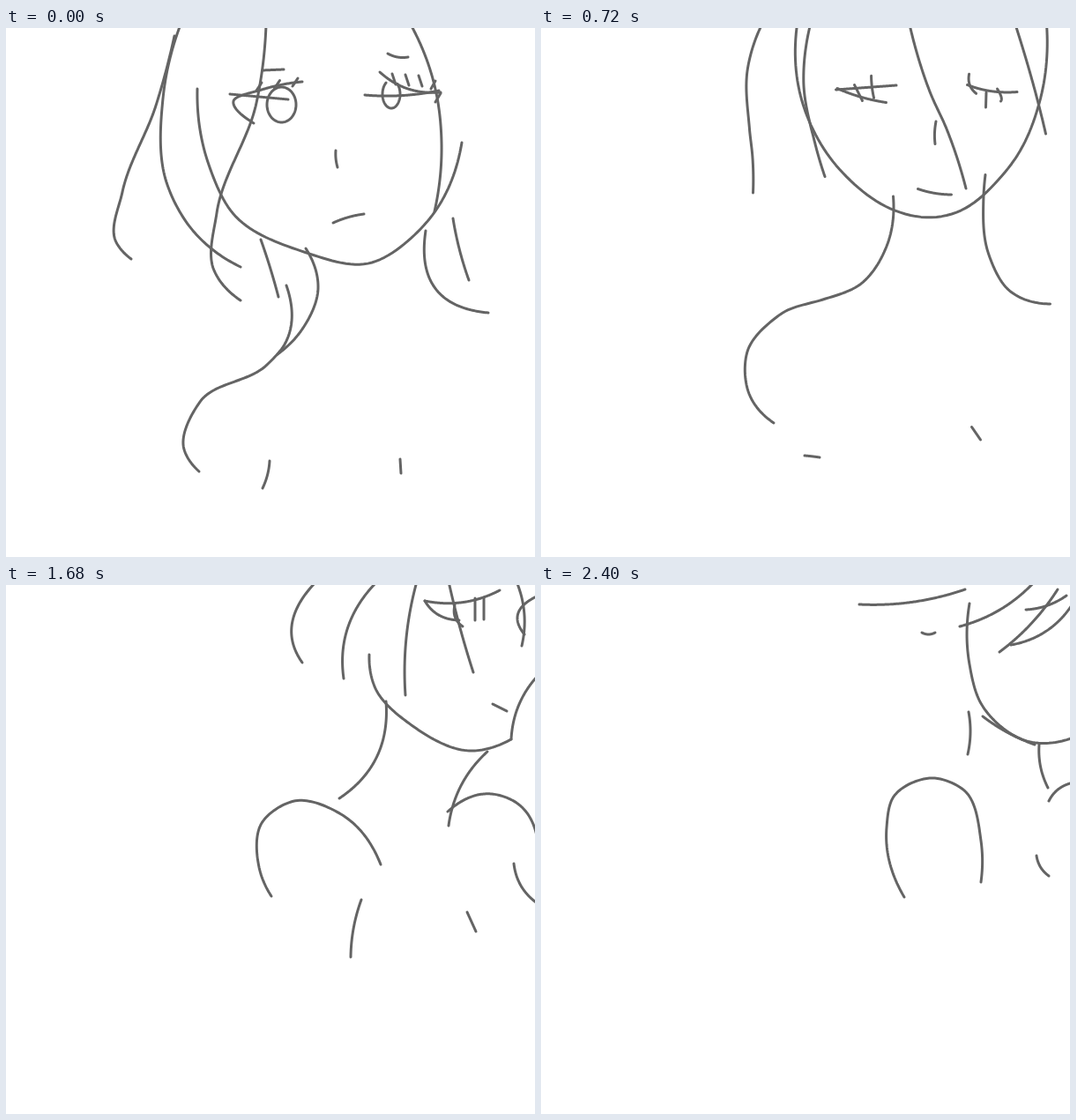
Animation, 600 px wide and 600 px high, one loop 2480 ms. Source, as an HTML page with a canvas:

```html
<!DOCTYPE html>
<html lang="en">
<head>
<meta charset="utf-8">
<title>Line sketch</title>
<style>
html, body { margin: 0; width: 100%; height: 100%; overflow: hidden; background: #fff; }
canvas { display: block; width: 600px; height: 600px; }
</style>
</head>
<body>
<canvas id="stage" width="600" height="600"></canvas>
<script>
const ctx = document.getElementById('stage').getContext('2d');
const STEP = 80, STEPS = 31, SAMPLES = 96;

const lerp = (a, b, k) => a + (b - a) * k;
const trace = point => Array.from({ length: SAMPLES + 1 }, (_, i) => point(i / SAMPLES));

// Smooth curve through a few points, paced by the distance between them.
function curve(...coords) {
  const points = [], knots = [0];
  for (let i = 0; i < coords.length; i += 2) points.push([coords[i], coords[i + 1]]);
  const last = points.length - 1;
  for (let i = 0; i < last; i++) {
    knots.push(knots[i] + Math.hypot(points[i + 1][0] - points[i][0], points[i + 1][1] - points[i][1]));
  }
  const slope = (i, axis) => (points[i + 1][axis] - points[i][axis]) / (knots[i + 1] - knots[i]);
  const tangent = (i, axis) => {
    if (last === 1) return slope(0, axis);
    if (i === 0) return 2 * slope(0, axis) - tangent(1, axis);
    if (i === last) return 2 * slope(last - 1, axis) - tangent(last - 1, axis);
    const share = (knots[i] - knots[i - 1]) / (knots[i + 1] - knots[i - 1]);
    return lerp(slope(i - 1, axis), slope(i, axis), share);
  };
  return trace(t => {
    const pos = t * knots[last];
    let i = 0;
    while (i < last - 1 && knots[i + 1] < pos) i++;
    const span = knots[i + 1] - knots[i], u = (pos - knots[i]) / span, v = 1 - u;
    return [0, 1].map(axis =>
      points[i][axis] * v * v * (1 + 2 * u) + points[i + 1][axis] * u * u * (1 + 2 * v) +
      span * u * v * (v * tangent(i, axis) - u * tangent(i + 1, axis)));
  });
}

const dash = (x, y, dx, dy) => trace(t => [x + dx * t, y + dy * t]);

const ring = (x, y, rx, ry, from = -Math.PI / 2, to = from + 2 * Math.PI) =>
  trace(t => [x + rx * Math.cos(lerp(from, to, t)), y + ry * Math.sin(lerp(from, to, t))]);

// Evenly spaced parallel dashes, named name0, name1, ...
const row = (name, count, [x, y], [dx, dy], [gapX, gapY]) => Object.fromEntries(
  Array.from({ length: count }, (_, i) => [name + i, dash(x + gapX * i, y + gapY * i, dx, dy)]));

// Key drawings; strokes of the same name morph into each other.
const poses = [
  { step: 0, strokes: {
    hairOuter: curve(191,9, 170,88, 132,186, 125,243, 142,262),
    hairSide: curve(198,-4, 178,80, 183,178, 213,231, 266,271),
    hairInner: curve(295,-4, 284,85, 239,210, 236,275, 266,309),
    hairRight: curve(459,-4, 486,65, 494,130, 486,208),
    jaw: curve(217,69, 231,158, 258,211, 338,254, 411,267, 472,226, 517,130),
    lidL: dash(254,75, 66,6),
    lowL: curve(281,108, 258,83, 290,70, 336,61),
    irisL: ring(312.5,87, 16.5,20),
    ...row('lashL', 3, [284,71], [6,-9], [20.5,-2.5]),
    browL: dash(291,48, 24,-1),
    lidR: curve(407,76, 440,77, 491,71),
    lowR: curve(424,50, 446,65, 493,73),
    cornerR: dash(493,74, -6,10),
    irisR: ring(437,75, 10,16, -2.2, -7.1),
    ...row('lashR', 3, [438,52], [4,12], [15,1]),
    lashEndR: dash(487,60, -5,9),
    browR: curve(433,29, 444,33, 456,33),
    nose: curve(374,139, 374,147, 376,158),
    mouth: curve(371,221, 387,215, 406,211),
    neckL: curve(289,240, 299,270, 309,305),
    nape: curve(340,250, 354,295, 335,343, 308,370),
    shoulderL: curve(318,292, 317,357, 296,382, 220,424, 202,478, 219,503),
    neckR: curve(476,230, 489,298, 547,323),
    neckBack: curve(507,216, 514,250, 525,286),
    chestL: curve(299,491, 297,505, 291,522),
    chestR: dash(447,489, 1,16)
  } },
  { step: 6, strokes: {
    hairOuter: curve(247,-4, 209,61, 195,155, 188,203, 166,262),
    hairSide: curve(302,-4, 274,75, 263,175, 252,235),
    hairInner: curve(306,-4, 323,70, 321,169),
    fringe: curve(438,-4, 449,95, 434,212),
    hairRight: curve(540,-4, 548,90, 541,194),
    hairTail: curve(577,107, 553,153, 480,208, 439,237),
    jaw: curve(269,4, 269,97, 314,177, 427,238, 475,226, 530,174, 557,95, 562,-4),
    lidL: dash(308,100, 73,14),
    lowL: dash(311,97, 59,8),
    ...row('lashL', 2, [311,109], [15,-4], [22,6]),
    ...row('lashEndL', 2, [352,109], [3,12], [15,-1]),
    foldL: dash(311,97, 18,-2),
    browL: dash(364,88, 15,0),
    lidR: curve(474,112, 500,115, 530,116),
    lowR: dash(485,109, 33,1),
    ...row('lashR', 3, [489,116], [1,10], [15,-3]),
    browR: dash(490,96, 9,2),
    nose: curve(421,124, 419,140, 421,159),
    mouth: curve(396,210, 424,218, 447,220),
    neckL: curve(357,204, 357,265, 348,317),
    shoulderL: curve(389,218, 382,270, 340,315, 248,364, 222,425, 243,484, 282,506),
    neckR: curve(480,199, 488,268, 512,306, 551,327),
    upperArm: curve(551,327, 561,355, 573,411),
    neckBack: curve(519,204, 517,266, 528,322),
    chestL: dash(298,498, 4,25),
    chestR: dash(480,455, 3,20),
    armR: curve(567,402, 567,420, 569,437)
  } },
  { step: 12, strokes: {
    hairOuter: curve(254,-4, 268,55, 315,112),
    hairSide: curve(309,-4, 330,58, 392,102),
    fringe: curve(398,-4, 433,66, 473,99, 530,152),
    hairRight: curve(536,-4, 555,16, 604,46),
    jaw: curve(311,-4, 324,72, 360,140, 409,181, 472,190, 526,147, 565,95, 585,-4),
    lidL: dash(361,40, 64,-24),
    lowL: curve(361,40, 380,53, 413,64),
    irisL: curve(387,31, 388,45, 390,56),
    lashL0: dash(400,20, 3,40),
    lidR: curve(493,17, 515,27, 550,29),
    lowR: curve(550,29, 545,43, 525,56),
    irisR: curve(498,29, 499,42, 506,51),
    lashR0: dash(521,30, -2,24),
    nose: dash(475,88, -2,16),
    mouth: curve(459,155, 470,157, 484,158),
    shoulderL: curve(410,164, 407,212, 392,260, 347,278, 295,282, 245,306, 232,350, 246,390),
    neckR: curve(528,134, 525,165, 525,240, 550,289, 604,299),
    chestL: curve(300,472, 315,461, 330,451),
    chestR: dash(497,450, 17,9)
  } },
  { step: 17, strokes: {
    hairOuter: curve(360,-4, 306,37, 254,52),
    hairSide: curve(353,-4, 310,55, 313,107),
    hairInner: curve(399,-4, 358,65, 346,112, 330,135),
    fringe: curve(536,-4, 500,67, 412,131),
    hairRight: curve(606,20, 590,45, 566,73),
    jaw: curve(363,95, 392,143, 430,165, 523,188, 560,177),
    profile: curve(560,177, 573,145, 600,106),
    bridge: curve(600,97, 572,66, 561,-4),
    lidL: curve(459,28, 490,23, 518,7),
    lowL: dash(463,28, 45,11),
    irisL: dash(491,23, 0,18),
    lashL0: curve(507,12, 508,30, 506,45),
    mouth: dash(533,141, 24,6),
    neckL: curve(433,166, 412,211, 388,239),
    shoulderL: curve(413,339, 409,280, 355,244, 310,273, 292,320, 307,358),
    neckR: curve(527,184, 515,230, 513,257),
    shoulderR: curve(515,234, 552,235, 568,270, 559,306),
    chestR: curve(518,314, 527,326, 538,334)
  } },
  { step: 21, strokes: {
    hairOuter: curve(352,-4, 326,68, 336,88),
    hairSide: curve(421,-4, 384,62, 383,106),
    hairInner: curve(466,-4, 454,60, 453,125),
    fringe: curve(502,-4, 514,45, 530,99),
    hairRight: curve(579,-4, 588,35, 585,69),
    jaw: curve(412,79, 418,115, 460,159, 530,188, 573,175),
    profile: curve(573,175, 583,133, 604,102),
    lidL: curve(475,18, 515,20, 560,6),
    lowL: curve(475,18, 485,30, 514,40),
    irisL: curve(509,23, 510,38, 518,47),
    ...row('lashL', 2, [532,15], [0,25], [10,-1]),
    lowR: curve(604,12, 580,38, 588,56),
    mouth: dash(552,135, 16,8),
    neckL: curve(431,132, 419,198, 378,242),
    shoulderL: curve(425,317, 380,260, 327,245, 290,270, 287,320, 301,353),
    neckR: curve(546,189, 518,224, 502,273),
    shoulderR: curve(501,257, 551,237, 579,247, 604,298),
    chestL: curve(403,357, 395,385, 391,422),
    chestR: dash(523,371, 10,22),
    armR: curve(576,316, 584,341, 604,362)
  } },
  { step: 27, strokes: {
    hairOuter: curve(389,-4, 389,75, 413,108),
    hairSide: curve(449,-4, 458,67, 468,91),
    hairInner: curve(461,48, 458,105, 467,147),
    fringe: curve(522,-4, 525,40, 539,75),
    hairRight: curve(590,-4, 592,22, 599,45),
    jaw: curve(432,77, 447,121, 500,170, 550,185, 580,172, 604,134),
    mouth: dash(561,65, 29,4),
    neckL: curve(460,120, 452,165, 430,206),
    shoulderL: curve(464,267, 405,224, 379,217, 332,228, 320,270, 345,385),
    neckR: curve(547,185, 537,210, 535,235),
    shoulderR: curve(537,256, 565,243, 604,222),
    chestR: curve(538,320, 540,332, 544,341)
  } },
  { step: 30, strokes: {
    hairOuter: curve(481,5, 430,18, 361,22),
    wisp: curve(432,54, 440,56, 447,54),
    hairSide: curve(560,-4, 527,24, 475,47),
    hairInner: curve(586,5, 552,48, 520,76),
    fringe: curve(596,12, 575,23, 550,28),
    hairRight: curve(604,20, 572,53, 533,68),
    jaw: curve(486,21, 486,90, 500,136, 555,178, 604,173),
    jawLine: curve(501,149, 525,165, 560,181),
    neckL: curve(485,144, 487,165, 484,192),
    shoulderL: curve(499,337, 499,290, 480,233, 445,219, 400,240, 392,275, 412,354),
    neckR: curve(565,181, 567,208, 575,230),
    shoulderR: curve(576,245, 583,235, 604,224),
    chestR: curve(562,307, 566,319, 576,330)
  } }
];

const morph = (a, b, k) => a.map(([x, y], i) => [lerp(x, b[i][0], k), lerp(y, b[i][1], k)]);
const shift = (line, [dx, dy], k) => line.map(([x, y]) => [x + dx * k, y + dy * k]);

function stroke(line) {
  ctx.beginPath();
  line.forEach(([x, y]) => ctx.lineTo(x, y));
  ctx.stroke();
}

function draw(step) {
  let n = poses.length - 2;
  while (poses[n].step > step) n--;
  const { step: first, strokes: a } = poses[n];
  const { step: last, strokes: b } = poses[n + 1];
  const k = (step - first) / (last - first);
  const chin = SAMPLES / 2;
  const drift = [0, 1].map(axis => b.jaw[chin][axis] - a.jaw[chin][axis]);

  ctx.fillStyle = '#fff';
  ctx.fillRect(0, 0, 600, 600);
  ctx.strokeStyle = '#646464';
  ctx.lineWidth = 3;
  ctx.lineCap = ctx.lineJoin = 'round';
  for (const name of Object.keys({ ...a, ...b })) {
    if (a[name] && b[name]) stroke(morph(a[name], b[name], k));
    else if (a[name] && k < 0.5) stroke(shift(a[name], drift, k));
    else if (b[name] && k >= 0.5) stroke(shift(b[name], drift, k - 1));
  }
}

const start = performance.now();
function tick() {
  draw(Math.floor((performance.now() - start) / STEP) % STEPS);
  requestAnimationFrame(tick);
}
tick();
</script>
</body>
</html>
```
